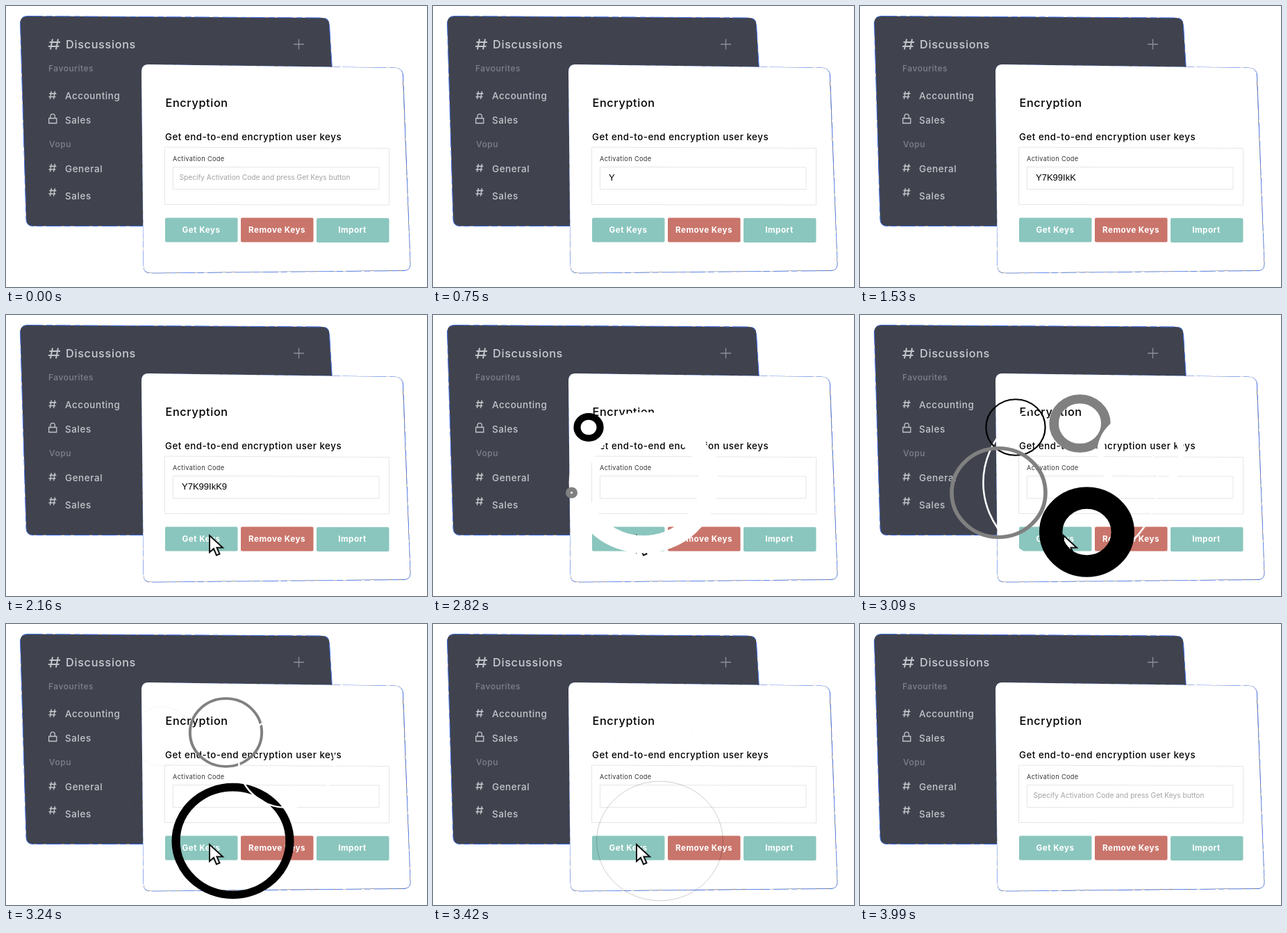
Animation of 606x404 px, one loop 4.8 s. Source, as an HTML page:

```html
<!DOCTYPE html>
<html lang="en">
<head>
<meta charset="utf-8">
<title>Encryption keys</title>
<style>
  html, body { margin: 0; width: 100%; height: 100%; overflow: hidden; background: #fff; }
  svg { display: block; width: 606px; height: 404px; }
  text { font-family: Inter, "Open Sans", sans-serif; letter-spacing: .04em; }
  .edge { stroke: #4674ee; stroke-width: 1; stroke-dasharray: 22 5 9 4; }
  .item { font-size: 13.5px; font-weight: 500; fill: #c3c5ca; }
  .label { font-size: 12.1px; font-weight: 500; fill: #7e818a; }
  .icon { fill: none; stroke: #c3c5ca; }
  .button { font-size: 11.7px; font-weight: 700; fill: #fff; text-anchor: middle; }
  .field { fill: #fff; stroke: #e6e6e6; }
  #hint { font-size: 10.2px; letter-spacing: 0; fill: #a3a3a3; }
  #code { font: 13px "Liberation Sans", Arial, sans-serif; letter-spacing: 0; }
</style>
</head>
<body>
<svg viewBox="0 0 606 404">
  <defs>
    <path id="hash" d="M6 0L3 15M14 0L11 15M1.5 4.5H17M0 10.5H15.5"/>
  </defs>

  <path class="edge" fill="#40434e" d="M31 14.5L455 17Q465 17 465.500 27L470 100V316.500H39Q29.500 316.500 29 307L20.500 25Q20.500 14.500 31 14.500Z"/>
  <use href="#hash" class="icon" stroke-width="2" x="61" y="47.500"/>
  <text x="86" y="61" font-size="16.3" font-weight="500" fill="#c9cbd0">Discussions</text>
  <path d="M414 55H429M421.500 47.500V62.500" stroke="#8d9098" stroke-width="1.300"/>
  <text class="label" x="61" y="94">Favourites</text>
  <text class="item" x="85" y="134">Accounting</text>
  <text class="item" x="85" y="169">Sales</text>
  <text class="label" x="62" y="203">Vopu</text>
  <text class="item" x="85" y="239">General</text>
  <text class="item" x="85" y="278">Sales</text>
  <g class="icon" stroke-width="2.200">
    <use href="#hash" transform="translate(61.500 122.500) scale(.64 .76)"/>
    <use href="#hash" transform="translate(61.500 227) scale(.64 .76)"/>
    <use href="#hash" transform="translate(61.500 262) scale(.64 .76)"/>
  </g>
  <path class="icon" stroke-width="1.300" d="M61.700 161.500H72.800V168.500H61.700ZM64 161V158.500a3.200 3.200 0 0 1 6.400 0V161"/>

  <path class="edge" d="M205 84.500L561 89Q571 90 571.500 100L582 370Q582.500 380 573 380.500L208 384Q198 384 198 374L195.500 95Q195 84.500 205 84.500Z"/>
  <path fill="#fff" d="M205 84L561 89Q571 90 571 100L581.700 370Q582 380 573 380L208 383.700Q198.300 384 198 374L195 95Q195 84 205 84Z"/>
  <text x="229.500" y="145" font-size="16.2" font-weight="500">Encryption</text>
  <text x="229" y="193" font-size="13.3" font-weight="500">Get end-to-end encryption user keys</text>
  <path class="field" d="M228.500 203L551.500 204.500V286L228.500 285.500Z"/>
  <text x="240" y="223" font-size="9.200" fill="#333">Activation Code</text>
  <path class="field" d="M240.500 231.500L537 232V263.500H240.500Z"/>
  <text id="hint" x="249.500" y="250">Specify Activation Code and press Get Keys button</text>
  <text id="code" x="253" y="251"></text>

  <rect x="229" y="304.500" width="104.500" height="35" rx="2" fill="#8ac6be"/>
  <rect x="338" y="304.500" width="104.500" height="35" rx="2" fill="#c9756b"/>
  <rect x="447" y="305" width="104.500" height="35" rx="2" fill="#8ac6be"/>
  <text class="button" x="281" y="326">Get Keys</text>
  <text class="button" x="390" y="326">Remove Keys</text>
  <text class="button" x="498.500" y="326">Import</text>

  <path id="cursor" fill="#fff" stroke="#111" stroke-width="2" d="M1 1V25L7 20L11 29.500L15.500 27.500L11.500 18.500H20Z"/>
  <g id="rings" fill="none"></g>
</svg>
<script>
const LOOP = 4800, TICK = 30;
const CODE = 'Y7K99IkK9';
const $ = id => document.getElementById(id);
const clamp = v => Math.max(0, Math.min(1, v));
const easeOut = p => 1 - (1 - p) ** 3;
const easeInOut = p => (1 - Math.cos(Math.PI * p)) / 2;

// colour, centre x, centre y, radius, first stroke width, start, duration
const rings = [
  ['#fff', 303, 241, 128, 138, 2565, 715],
  ['#000', 224, 161.5, 45, 44, 2741, 558],
  ['#808080', 199.5, 255.5, 71.5, 106, 2809, 455],
  ['#808080', 316.5, 156, 55.5, 62, 2922, 540],
  ['#000', 326.5, 312, 91, 136, 2964, 515],
  ['#fff', 404, 199, 72, 60, 2804, 677]
].map(([stroke, x, y, radius, width, start, time]) => {
  const el = document.createElementNS('http://www.w3.org/2000/svg', 'circle');
  el.setAttribute('stroke', stroke);
  el.setAttribute('transform', `translate(${x} ${y}) scale(1 .945)`);
  $('rings').append(el);
  return { el, radius, width, start, time };
});

const show = (el, on) => el.setAttribute('visibility', on ? 'visible' : 'hidden');

function draw(t) {
  show($('hint'), t < 630 || t >= 3990);
  const typed = t < 2550 ? Math.floor((t - 615) / 113.3) : 0;
  $('code').textContent = CODE.slice(0, Math.max(0, typed));

  const move = easeInOut(clamp((t - 1740) / 420));
  show($('cursor'), t >= 1740 && t < 3480);
  $('cursor').setAttribute('transform', `translate(${571 - 279 * move} ${334 - 18 * move})`);

  for (const { el, radius, width, start, time } of rings) {
    const p = (t - start) / time;
    const s = easeOut(clamp(p));
    show(el, p > 0 && p < 1);
    el.setAttribute('r', radius * s);
    el.setAttribute('stroke-width', width * (1 - s) * s);
  }
}

const begin = performance.now();
function frame() {
  const t = (performance.now() - begin) % LOOP;
  draw(Math.floor(t / TICK) * TICK);
  requestAnimationFrame(frame);
}
frame();
</script>
</body>
</html>
```
